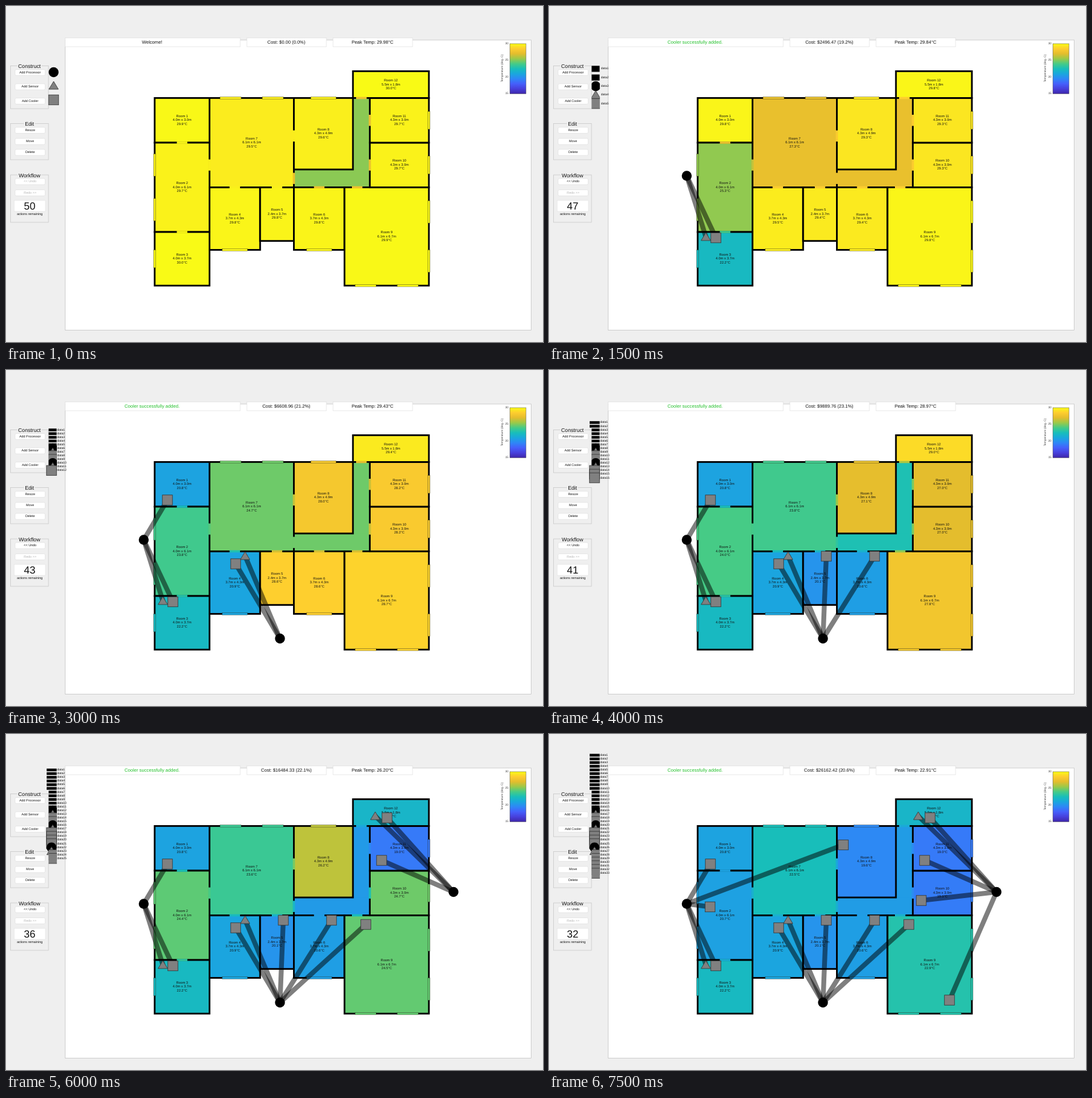
Animation, 885 px wide and 553 px high, one loop 8000 ms. Source, as an HTML page:

```html
<!DOCTYPE html>
<html lang="en">
<head>
<meta charset="utf-8">
<title>Room cooling planner</title>
<style>
html, body { margin: 0; width: 100%; height: 100%; overflow: hidden; background: #efefef; }
svg { display: block; width: 100%; height: 100%; }
text {
  font-family: "Liberation Sans", Arial, sans-serif;
  dominant-baseline: central;
  text-rendering: geometricPrecision;
}
</style>
</head>
<body>
<svg id="stage" viewBox="0 0 885 553"></svg>
<script>
const STEP = 500, COUNT = 16, HALL = 13;

// The plan is measured in feet
const px = ft => 245 + ft * 6.953;
const py = ft => 107.3 + ft * 7.352;
const metres = ft => (ft * .3048).toFixed(1) + 'm';

// Left, top, width, height, how strongly the room follows the shared drift
const rooms = [
  [0, 6, 13, 10, .3], [0, 16, 13, 20], [0, 36, 13, 12, .1], [13, 26, 12, 14, .7],
  [25, 26, 8, 12, .8], [33, 26, 12, 14, .8], [13, 6, 20, 20], [33, 6, 14, 16],
  [45, 26, 20, 22], [51, 16, 14, 10, 1], [51, 6, 14, 10, 1], [47, 0, 18, 6]
];
const hall = [[47, 6, 4, 20], [33, 22, 18, 4]];
const doors = {
  across: [[6.5, 16], [6.5, 36], [19, 26], [29, 26], [39, 26], [48, 26], [49, 6]],
  down: [[13, 21], [33, 14.5], [33, 24], [51, 11], [51, 21]]
};
// Centre and length
const panes = {
  across: [[18, 6, 5], [28, 6, 5], [40, 6, 6], [19, 40, 6], [39, 40, 6], [50, 48, 5], [60, 48, 5]],
  down: [[0, 21, 5], [0, 31, 5], [0, 42, 4], [65, 11, 4], [65, 21, 4], [65, 31.5, 5], [65, 42.5, 5]]
};

// Step, kind (p, s, c), place, processor, temperature a cooler holds
const parts = [
  [1, 'p', 227, 279.5, 0], [2, 's', 258.5, 380, 0],
  [3, 'c', 275, 381.5, 0, 22.2], [4, 'c', 266, 214, 0, 20.8],
  [5, 'p', 451.5, 442, 1], [5, 's', 394, 306, 1],
  [6, 'c', 378.5, 319, 1, 20.9], [7, 'c', 457, 306.5, 1, 20.1],
  [8, 'c', 536.5, 306.5, 1, 20.6], [9, 'c', 593, 313.5, 1],
  [10, 'p', 737.5, 260, 2], [10, 's', 608.5, 135, 2],
  [11, 'c', 628, 138, 2, 21.9], [12, 'c', 619, 208, 2, 19],
  [13, 'c', 613.5, 274, 2, 19.1], [13, 'c', 485, 182.5, 0, 19.6],
  [14, 'c', 265.5, 284.5, 0, 20.7], [15, 'c', 660, 438, 2]
].map(([step, kind, x, y, proc, hold]) => ({ step, kind, x, y, proc, hold }));
const procs = parts.filter(p => p.kind === 'p');

// Key points by number of coolers in place
const keys = [0, 1, 3, 5, 6, 8, 12];
const drift = [29.7, 29.3, 28.2, 27, 26.8, 24.7];
const paths = {
  2: [29.7, 25.3, 23.8, 24, 24.1, 24.4],
  7: [29.5, 27.3, 24.7, 23.8, 24, 23.6, 22.5],
  8: [29.6, 29.3, 28, 27.1, 27, 26.2],
  9: [29.9, 29.8, 28.7, 27.8, 25.3, 24.5, 22.91],
  12: [29.98, 29.84, 29.43, 28.97, 28.82],
  [HALL]: [25.2, 27.3, 24.7, 22.7, 22.4, 20.4, 20.5]
};
const cost = [0, 2496.47, 6608.96, 9889.76, 11559.63, 16484.33, 26162.42];
const share = [0, 19.2, 21.2, 23.1, 23.9, 22.1, 20.6];

// Evenly spaced from 15 to 30 degrees
const ramp = ['3e26a8', '4740dc', '455ffb', '2e87f6', '1aa7dd', '18beba',
  '46cb86', '9cc948', 'e4bd2d', 'fecd2f', 'f9fb15'];

const mix = (a, b, w) => a + (b - a) * w;
const channels = hex => [0, 2, 4].map(i => parseInt(hex.substr(i, 2), 16));

function heat(t) {
  const u = Math.min(.9999, Math.max(0, (t - 15) / 15)) * (ramp.length - 1);
  const i = Math.floor(u), b = channels(ramp[i + 1]);
  return `rgb(${channels(ramp[i]).map((v, k) => Math.round(mix(v, b[k], u - i)))})`;
}

function along(values, n) {
  const i = keys.findIndex(k => k >= n);
  if (i >= values.length) return values[values.length - 1];
  return i ? mix(values[i - 1], values[i], (n - keys[i - 1]) / (keys[i] - keys[i - 1])) : values[0];
}

// Room number at a point in feet, 0 outside
function roomAt(x, y) {
  const inside = ([l, t, w, h]) => x > l && x < l + w && y > t && y < t + h;
  return rooms.findIndex(inside) + 1 || (hall.some(inside) ? HALL : 0);
}

function tempsFor(live) {
  const coolers = live.filter(p => p.kind === 'c'), n = coolers.length;
  const t = [];
  for (let r = 1; r <= HALL; r++) {
    t[r] = paths[r] ? along(paths[r], n) : 30 - rooms[r - 1][4] * (30 - along(drift, n));
  }
  for (const c of coolers) {
    if (c.hold) t[roomAt((c.x - 245) / 6.953, (c.y - 107.3) / 7.352)] = c.hold;
  }
  return t;
}

const rect = (x, y, w, h, fill, more = '') =>
  `<rect x="${x}" y="${y}" width="${w}" height="${h}" fill="${fill}" ${more}/>`;
const text = (x, y, size, str, fill = '#111', anchor = 'middle', more = '') =>
  `<text x="${x}" y="${y}" font-size="${size}" fill="${fill}" text-anchor="${anchor}" ${more}>${str}</text>`;
const edge = (color, w) => `stroke="${color}" stroke-width="${w}"`;

function marker(kind, x, y) {
  if (kind === 'p') return `<circle cx="${x}" cy="${y}" r="8.2" fill="#000"/>`;
  const line = edge('#333', .8);
  if (kind === 'c') return rect(x - 8.25, y - 8.25, 16.5, 16.5, '#808080', line);
  return `<path d="M${x} ${y - 7}L${x + 7.8} ${y + 6}H${x - 7.8}Z" fill="#808080" ${line}/>`;
}

function button(y, label, state = '') {
  return rect(15, y - 5, 49.5, 10, state === 'on' ? '#ececec' : '#fff', 'rx="2" ' + edge('#dcdcdc', .6)) +
    text(39.7, y, 5.4, label, state === 'off' ? '#b4b4b4' : '#111');
}

function panel(top, bottom, title, cover) {
  return rect(7.5, top, 62.5, bottom - top, 'none', edge('#c9c9c9', .8)) +
    rect(38.5 - cover / 2, top - 4, cover, 8, '#efefef') + text(38.7, top + .6, 8.7, title);
}

function controls(live, last) {
  const on = kind => last && last.kind === kind ? 'on' : '';
  return panel(98.5, 169, 'Construct', 40) +
    button(109.5, 'Add Processor', on('p')) +
    button(133, 'Add Sensor', on('s')) +
    button(156.5, 'Add Cooler') +
    panel(193.5, 253, 'Edit', 18) +
    button(204.5, 'Resize') + button(223, 'Move') + button(241, 'Delete') +
    panel(278, 356, 'Workflow', 38) +
    button(289, '&lt;&lt; Undo', last ? '' : 'off') + button(307.5, 'Redo &gt;&gt;', 'off') +
    rect(13.5, 320, 51.5, 18, '#fff', edge('#e2e2e2', .6)) +
    text(39, 329.5, 17, 50 - live.length) + text(39, 343, 5.4, 'actions remaining');
}

function header(live, last, peak) {
  const names = { p: 'Processor', s: 'Sensor', c: 'Cooler' };
  const n = live.filter(p => p.kind === 'c').length;
  const box = (x, w) => rect(x, 52.5, w, 14.5, '#fff', edge('#dedede', .7));
  return box(97.5, 288.5) + box(397, 131) + box(539, 131) +
    (last ? text(240.7, 59.7, 7.6, names[last.kind] + ' successfully added.', '#22c02a')
          : text(240.7, 59.7, 7.6, 'Welcome!')) +
    text(462, 59.7, 7.5, `Cost: $${along(cost, n).toFixed(2)} (${along(share, n).toFixed(1)}%)`) +
    text(604, 59.7, 7.5, `Peak Temp: ${peak.toFixed(2)}°C`);
}

function colorbar() {
  const stops = ramp.map((c, i) => `<stop offset="${i / 10}" stop-color="#${c}"/>`).join('');
  const ticks = [30, 25, 20, 15].map((v, i) => text(828, 62.2 + i * 27.4, 4.8, v, '#444', 'end')).join('');
  return `<linearGradient id="bar" x1="0" y1="1" x2="0" y2="0">${stops}</linearGradient>` +
    rect(830.3, 62, 26.7, 82.5, 'url(#bar)', edge('#555', .5)) + ticks +
    text(818.5, 102.5, 4.8, 'Temperature (deg. C)', '#444', 'middle', 'transform="rotate(-90 818.5 102.5)"');
}

// A strip lying on a wall, tinted by the rooms on either side
function strip(x, y, len, down, t, more) {
  const sides = down ? [roomAt(x - .5, y), roomAt(x + .5, y)] : [roomAt(x, y - .5), roomAt(x, y + .5)];
  const near = sides.filter(r => r).map(r => t[r]);
  const fill = heat(near.reduce((a, b) => a + b) / near.length);
  return down
    ? rect(px(x) - 1.8, py(y - len / 2), 3.6, len * 7.352, fill, more)
    : rect(px(x - len / 2), py(y) - 1.8, len * 6.953, 3.6, fill, more);
}

function plan(t) {
  const wall = edge('#000', 2.8), thin = edge('rgba(40,40,20,.6)', .6);
  const box = ([x, y, w, h], fill, more) => rect(px(x), py(y), px(w) - px(0), py(h) - py(0), fill, more);
  let out = '', notes = '';
  for (const h of hall) out += box(h, heat(t[HALL]));
  rooms.forEach((room, i) => {
    const [x, y, w, h] = room, v = t[i + 1];
    out += box(room, heat(v), wall);
    [`Room ${i + 1}`, `${metres(w)} x ${metres(h)}`, v.toFixed(1) + '°C'].forEach((s, k) => {
      notes += text(px(x + w / 2), py(y + h / 2) + (k - 1) * 6.5 + .2, 5.6, s);
    });
  });
  for (const dir of ['across', 'down']) {
    for (const [x, y] of doors[dir]) out += strip(x, y, 2.5, dir === 'down', t);
    for (const [x, y, len] of panes[dir]) out += strip(x, y, len, dir === 'down', t, thin);
  }
  return out + notes;
}

function network(live) {
  const links = live.filter(p => p.kind !== 'p').map(p => {
    const q = procs[p.proc];
    return `<line x1="${q.x}" y1="${q.y}" x2="${p.x}" y2="${p.y}" stroke="#000" stroke-opacity=".5" stroke-width="8"/>`;
  });
  return links.join('') + live.map(p => marker(p.kind, p.x, p.y)).join('');
}

// Newest links first, then the parts in order; early entries are cut narrow
function legend(live) {
  if (!live.length) return marker('p', 78.5, 109) + marker('s', 78.5, 131) + marker('c', 78.5, 154.5);
  const links = live.filter(p => p.kind !== 'p').reverse();
  const n = links.length + live.length;
  const gap = Math.max(6.07, 71.5 / n), tall = Math.min(10, gap * .74);
  let out = '<clipPath id="cut"><rect x="70.3" y="0" width="13.5" height="553"/></clipPath>', labels = '';
  [...links, ...live].forEach((p, i) => {
    const y = 132 + (i - (n - 1) / 2) * gap;
    const isLink = i < links.length;
    const wide = isLink ? p.step > 6 : Math.abs(p.step - 8) < 3;
    const icon = isLink ? rect(67, y - tall / 2, 16.5, tall, '#000') : marker(p.kind, wide ? 75 : 77, y);
    out += wide ? icon : `<g clip-path="url(#cut)">${icon}</g>`;
    labels += text(n > 5 ? 84.5 : 85.7, y, 5, 'data' + (i + 1), '#111', 'start');
  });
  return out + labels;
}

const stage = document.getElementById('stage');

function draw(step) {
  const live = parts.filter(p => p.step <= step);
  const last = live[live.length - 1];
  const t = tempsFor(live);
  stage.innerHTML = rect(0, 0, 885, 553, '#efefef') +
    rect(97.5, 56, 768, 477.5, '#fff', edge('#c4c4c4', .8)) +
    header(live, last, Math.max(...t.slice(1))) + colorbar() + controls(live, last) +
    plan(t) + network(live) + legend(live);
}

let shown = -1;
function tick() {
  const step = Math.floor(performance.now() / STEP) % COUNT;
  if (step !== shown) draw(shown = step);
  requestAnimationFrame(tick);
}
tick();
</script>
</body>
</html>
```
